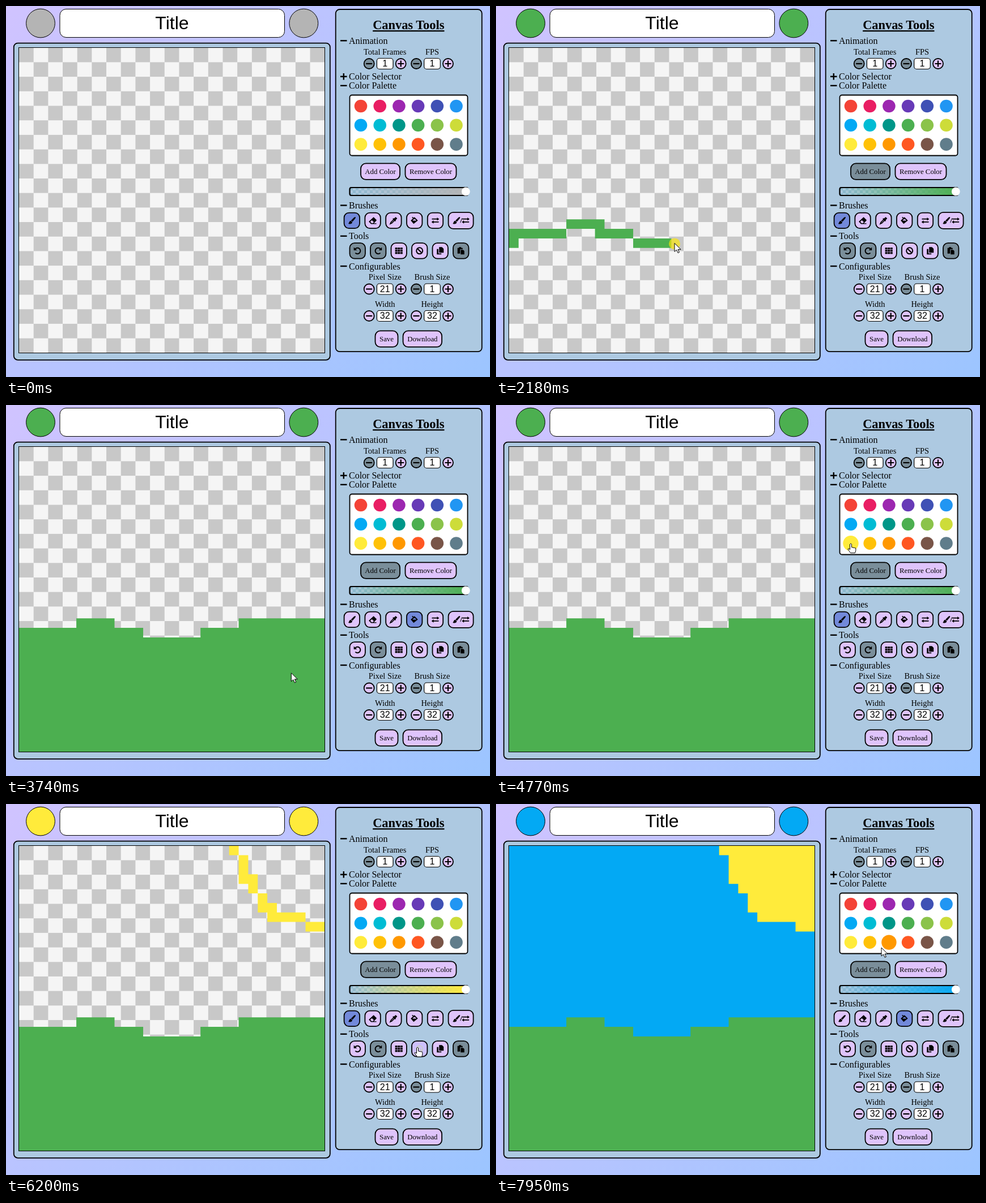
Recreate the animation shown at these times as an HTML page. Size 854 by 656 pixels, loop 7.99 s.

```html
<!DOCTYPE html>
<html lang="en">
<head>
<meta charset="utf-8">
<title>Pixel editor</title>
<style>
html, body { margin: 0; width: 100%; height: 100%; overflow: hidden; }
svg { display: block; font-family: "Liberation Serif", "Times New Roman", serif; }
text { text-anchor: middle; }
.left { text-anchor: start; }
.sans { font-family: "Liberation Sans", Arial, sans-serif; }
.line { fill: none; stroke: currentColor; stroke-width: 2; }
.panel { fill: #adc9e1; stroke: #000; stroke-width: 1.8; }
.icon { fill: currentColor; fill-rule: evenodd; }
</style>
</head>
<body>
<svg id="stage" width="854" height="656" viewBox="0 0 854 656"></svg>
<script>
const LOOP = 7990, LEFT = 23, TOP = 73.7, WIDE = 539.2, HIGH = 539.6, COUNT = 32;
const LILAC = '#dfc4fb', GREY = '#7a8e9a', ACTIVE = '#7289da', HOVER = '#cabffc';
const palette = ('f44336 e91e63 9c27b0 673ab7 3f51b5 2196f3 03a9f4 00bcd4 009688 ' +
  '4caf50 8bc34a cddc39 ffeb3b ffc107 ff9800 ff5722 795548 607d8b').split(' ').map(c => '#' + c);
const AZURE = 6, GREEN = 9, LIME = 11, YELLOW = 12, ORANGE = 14;
const brushes = ['brush', 'eraser', 'dropper', 'bucket', 'swap', 'both'];
const tools = ['undo', 'redo', 'grid', 'ban', 'copy', 'paste'];

const clamp = v => Math.max(0, Math.min(1, v));
const ramp = (t, start) => clamp((t - start) / 200);
const mix = (a, b, k) => `color-mix(in srgb, ${b} ${k * 100}%, ${a})`;

// ---- places
const at = (x, y) => ({ x, y });
const dot = i => ({ x: 626 + i % 6 * 33.7, y: 177 + Math.floor(i / 6) * 33.8, color: palette[i] });
const brushAt = name => ({ x: 610.3 + 36.8 * brushes.indexOf(name), y: 379.3, tool: name });
const toolAt = name => ({ x: 620.2 + 36.5 * tools.indexOf(name), y: 432.8 });
const cellX = c => LEFT + c * WIDE / COUNT, cellY = r => TOP + r * HIGH / COUNT;
const cell = ([c, r]) => ({ x: cellX(c + .5), y: cellY(r + .5), canvas: true });

// ---- strokes: straight walks over the cells between corner points
function walk(points) {
  const out = [points[0]];
  for (const [c, r] of points.slice(1)) {
    const [c0, r0] = out[out.length - 1];
    const n = Math.max(Math.abs(c - c0), Math.abs(r - r0));
    for (let i = 1; i <= n; i++) out.push([Math.round(c0 + (c - c0) * i / n), Math.round(r0 + (r - r0) * i / n)]);
  }
  return out;
}
const ground = { color: palette[GREEN], start: 1530, end: 2740, down: true,
  cells: walk([[0, 20], [0, 19], [5, 19], [6, 18], [9, 18], [9, 19], [12, 19], [13, 20],
    [19, 20], [19, 19], [23, 19], [23, 18], [31, 18]]) };
const sun = { color: palette[YELLOW], start: 5250, end: 5850,
  cells: walk([[22, 0], [23, 1], [23, 3], [24, 3], [24, 4], [25, 5], [25, 6], [26, 6], [26, 7], [29, 7], [30, 8], [31, 8]]) };
const strokes = [ground, sun];
const cellTime = (s, i) => s.start + (s.end - s.start) * i / (s.cells.length - 1);

// ---- pointer script
const track = [], clicks = [], presses = [];
function visit(arrive, leave, place) {
  track.push([arrive, place.x, place.y], [leave, place.x, place.y]);
}
function click(arrive, leave, place) {
  visit(arrive, leave, place);
  clicks.push({ ...place, time: arrive + 60 });
  presses.push([arrive + 50, arrive + 90]);
}
function paint(s) {
  s.cells.forEach((c, i) => visit(cellTime(s, i), cellTime(s, i), cell(c)));
  presses.push([s.start - 40, s.end]);
}
visit(30, 30, at(806, 590));
visit(390, 590, dot(AZURE));
click(760, 900, dot(GREEN));
visit(1400, 1520, at(27, 416));
paint(ground);
visit(2920, 2920, at(641, 394));
click(3170, 3260, brushAt('bucket'));
click(3600, 3690, cell([26, 25]));
click(3850, 4080, brushAt('brush'));
visit(4330, 4330, dot(LIME));
click(4740, 4860, dot(YELLOW));
paint(sun);
visit(6170, 6230, at(726, 430));
click(6330, 6420, brushAt('bucket'));
click(6590, 6840, cell([28, 3]));
visit(6970, 7040, at(688, 258));
click(7200, 7310, dot(AZURE));
click(7590, 7690, cell([25, 13]));
visit(7850, 7910, dot(ORANGE));
visit(7950, LOOP, at(680, 254));

const fills = clicks.filter(c => c.canvas).map(c => c.time);
const last = (t, key) => clicks.filter(c => c[key] && c.time <= t).pop();

function pointer(t) {
  const i = track.findIndex(k => k[0] > t);
  if (i < 1) return [-99, -99];
  const [a, b] = [track[i - 1], track[i]];
  let k = (t - a[0]) / (b[0] - a[0]);
  if (b[0] - a[0] > 60) k = k * k * (3 - 2 * k);
  return [a[1] + (b[1] - a[1]) * k, a[2] + (b[2] - a[2]) * k];
}

function strokePath(s, t) {
  const filled = t >= fills[strokes.indexOf(s)];
  return s.cells.map(([c, r], i) => {
    if (t < (i ? cellTime(s, i) : s.start - 30)) return '';
    const right = cellX(filled && !s.down ? COUNT : c + 1);
    const bottom = cellY(filled && s.down ? COUNT : r + 1);
    return `M${cellX(c)} ${cellY(r)}H${right}V${bottom}H${cellX(c)}Z`;
  }).join('');
}

// ---- markup helpers
const text = (s, x, y, size, extra = '') => `<text x="${x}" y="${y}" font-size="${size}" ${extra}>${s}</text>`;
const box = (x1, y1, x2, y2, r, extra) =>
  `<rect x="${x1}" y="${y1}" width="${x2 - x1}" height="${y2 - y1}" rx="${r}" ${extra}/>`;
const path = (d, extra = '') => `<path d="${d}" ${extra}/>`;
const line = (d, w = 2) => path(d, `class="line" style="stroke-width:${w}"`);
const move = (x, s) => `<g transform="translate(${x} 0)">${s}</g>`;

const targets = [];
const off = () => GREY;
function button(cx, cy, w, h, r, inner, state = () => LILAC) {
  targets.push({ state, hit: (x, y) => Math.abs(x - cx) < w / 2 && Math.abs(y - cy) < h / 2 });
  return `<g class="target" transform="translate(${cx} ${cy})">
    ${box(1 - w / 2, 1 - h / 2, w / 2 - 1, h / 2 - 1, r, 'stroke="#000" stroke-width="1.8"')}
    <g class="icon">${inner}</g></g>`;
}
const label = (s, cx, cy, w, state) => button(cx, cy, w, 30.5, 9, text(s, 0, 4.3, 12.8), state);

const brush = path('M6-6.4C7.2-6 6.5-4.5 5.5-3L1 2.3-1.5 0 4-5.5ZM-1.9.5L.7 3C.6 6-3 6.5-6.5 5.8-4.5 4.5-5 1-1.9.5Z');
const swap = line('M-6-2.6H4M-4 2.6H6', 1.7) + path('M3-5.4L6.8-2.6 3 .2ZM-3-.2L-6.8 2.6-3 5.4Z');
const undo = line('M-4.2-3A5.2 5.2 0 1 1-3.8 3.8') + path('M-6.5-6.3V-.8H-1Z');
const steps = [-1, 0, 1];
const icons = {
  brush, swap, undo,
  redo: `<g transform="scale(-1 1)">${undo}</g>`,
  both: move(-8, brush) + line('M-1 4L2-4', 1) + move(8.5, swap),
  grid: steps.flatMap(i => steps.map(j => box(4.6 * i - 2, 4 * j - 1.6, 4.6 * i + 2, 4 * j + 1.6, 0))).join(''),
  ban: '<circle r="5.5" class="line"/>' + line('M-4-4L4 4'),
  eraser: path('M-7 2L1.5-6 7-.5 2 5H6.5V6.2H-3ZM-4.5 2.3L-2 4.8H0L2 3-1.5-.6Z'),
  dropper: line('M1-2.5L-4.5 3-5.8 5.8-3 4.5 2.5-1', 1.6) + line('M-1-3.5L3.5 1', 2) + line('M1.5-1.5L5-5', 4),
  bucket: path('M-6.5 0L0-6 6 0-1.5 6ZM-3.5.2H3.5L0-3.5Z') + line('M-4-6L0-2.5', 1.6),
  copy: path('M-2-6.5H3L6-3.5V3.5H-2ZM-6-3H-3.2V4.8H2V6.5H-6Z'),
  paste: path('M-6-5H-3.5V-6.5H.5V-5H3V-2.5H-1.5V5H-6ZM-.5-1.5H4L6 .5V6.5H-.5Z')
};

const section = (name, y, closed) => text(name, 605, y + 5.5, 16, 'class="left"') +
  line(`M590 ${y}h11.5` + (closed ? `M595.8 ${y - 5.7}v11.4` : ''), 2.4);

function counter(name, value, x, y, atMin) {
  const minus = 'M-5.5 0H5.5';
  const knob = (dx, d, state) => button(x + dx, y, 20, 20, 9, line(d, 2.2), state);
  return text(name, x, y - 16.5, 14.4) + knob(-28, minus, atMin ? off : undefined) +
    box(x - 14.3, y - 9.5, x + 14.3, y + 9.5, 4.5, 'fill="#fff" stroke="#000" stroke-width="1.2"') +
    text(value, x, y + 5.3, 16, 'class="sans"') + knob(28, minus + 'M0-5.5V5.5');
}

function swatch(color, i) {
  const { x: cx, y: cy } = dot(i);
  targets.push({ dot: true, hit: (x, y) => Math.hypot(x - cx, y - cy) < 15 });
  return `<circle class="target" cx="${cx}" cy="${cy}" r="11.3" fill="${color}"/>`;
}

function bucketOn(t) {
  return clicks.filter(c => c.tool).reduce((v, c) => v + (c.tool === 'bucket' ? 1 : -1) * ramp(t, c.time), 0);
}
const states = {
  brush: t => mix(ACTIVE, LILAC, bucketOn(t)),
  bucket: t => mix(LILAC, ACTIVE, bucketOn(t)),
  undo: t => mix(GREY, LILAC, ramp(t, ground.end + 40)),
  redo: off, paste: off
};
function tool(name, { x, y }) {
  return name === 'both' ? button(802.6, y, 46, 31, 8.5, icons.both) : button(x, y, 29.4, 29.5, 8.5, icons[name], states[name]);
}

const stage = document.getElementById('stage');
stage.innerHTML = `
<defs>
  <linearGradient id="wash" gradientUnits="userSpaceOnUse" x1="49" y1="-49" x2="805" y2="705">
    <stop stop-color="#d0c3ff"/><stop offset="1" stop-color="#9cc5ff"/></linearGradient>
  <linearGradient id="fade"><stop class="tint" stop-opacity="0"/><stop class="tint" offset="1"/></linearGradient>
  <pattern id="check" width="2" height="2" patternUnits="userSpaceOnUse"
    patternTransform="translate(${LEFT} ${TOP}) scale(${WIDE / 21} ${HIGH / 21})">
    <path d="M0 0h2v2h-2z" fill="#f5f5f5"/><path d="M0 0h1v1h-1zM1 1h1v1h-1z" fill="#c8c8c8"/></pattern>
  <pattern id="tiny" x="607" y="321" width="10" height="10" patternUnits="userSpaceOnUse">
    <path d="M0 0h5v5h-5zM5 5h5v5h-5z" fill="#8fbad2"/></pattern>
</defs>
<rect width="854" height="656" fill="url(#wash)"/>
${[61, 525.3].map(x => `<circle class="now" cx="${x}" cy="30.5" r="25.4" stroke="#000"/>`).join('')}
${box(95, 5.5, 491.5, 55.5, 11, 'fill="#fff" stroke="#000"')}
${text('Title', 293, 41, 32, 'class="sans"')}
${box(13.8, 65.6, 571.8, 625.8, 7, 'class="panel"')}
${box(581.7, 6, 839.7, 611.2, 7, 'class="panel"')}
${box(LEFT, TOP, LEFT + WIDE, TOP + HIGH, 0, 'fill="url(#check)"')}
${box(LEFT, TOP, LEFT + WIDE, TOP + HIGH, 0, `id="flood" fill="${palette[AZURE]}"`)}
${strokes.map(s => path('', `class="stroke" fill="${s.color}"`)).join('')}
${box(22.5, 73.5, 562.5, 613.5, 0, 'fill="none" stroke="#000"')}
${text('Canvas Tools', 710.3, 41, 22.4, 'font-weight="bold" text-decoration="underline"')}
${section('Animation', 61.3)}
${counter('Total Frames', 1, 668.7, 102, true)}
${counter('FPS', 1, 752, 102, true)}
${section('Color Selector', 124.7, true)}
${section('Color Palette', 140.8)}
${box(606.5, 157.5, 814.5, 264.5, 4, 'fill="#fff" stroke="#000" stroke-width="1.8"')}
${palette.map(swatch).join('')}
${label('Add Color', 660.5, 292.7, 71, t => mix(LILAC, GREY, ramp(t, clicks[0].time)))}
${label('Remove Color', 749.5, 292.7, 92)}
${['tiny', 'fade'].map(id => box(606.5, 321, 815, 335, 3, `fill="url(#${id})" stroke="#000" stroke-width="1.8"`)).join('')}
<circle cx="811.3" cy="328" r="7.4" fill="#fff"/>
${section('Brushes', 352.5)}
${brushes.map(b => tool(b, brushAt(b))).join('')}
${section('Tools', 406.8)}
${tools.map(b => tool(b, toolAt(b))).join('')}
${section('Configurables', 460)}
${counter('Pixel Size', 21, 668.7, 500.5)}
${counter('Brush Size', 1, 752, 500.5, true)}
${counter('Width', 32, 668.7, 548)}
${counter('Height', 32, 752, 548)}
${label('Save', 671.5, 588.7, 42)}
${label('Download', 734.8, 588.7, 70.5)}
<g id="pointer" stroke="#000" stroke-linejoin="round" fill="#fff">
  <circle id="press" r="10" cy="1" fill="#ffe800" fill-opacity=".65" stroke="none"/>
  <path id="arrow" d="M0 0V15L3.5 11.8 6 17.2 8.4 16.2 6 11H11Z"/>
  <path id="hand" d="M-1.5 1.5Q0-1 1.5 1.5V7L6.5 8Q8.8 7.5 8.8 9.5V13L7.5 17H-.5L-5 10.5Q-4.8 8-1.5 11Z"/>
</g>`;

const all = s => [...stage.querySelectorAll(s)];
const find = id => document.getElementById(id);
const show = (el, on) => el.setAttribute('visibility', on ? 'visible' : 'hidden');
all('.target').forEach((el, i) => targets[i].el = el);
const strokeEls = all('.stroke'), nowEls = all('.now'), tints = all('.tint');

function draw(t) {
  const color = (last(t, 'color') || { color: '#b4b4b4' }).color;
  nowEls.forEach(el => el.style.fill = color);
  tints.forEach(el => el.style.stopColor = color);
  strokeEls.forEach((el, i) => el.setAttribute('d', strokePath(strokes[i], t)));
  show(find('flood'), t >= fills[2]);

  // hover fades over the recent pointer positions
  const trail = [0, 1, 2, 3, 4].map(i => pointer(t - i * 25));
  const [x, y] = trail[0];
  let hand = false;
  for (const { el, dot, hit, state } of targets) {
    const fill = dot ? '' : state(t);
    const locked = fill === GREY;
    const hover = locked ? 0 : trail.filter(p => hit(...p)).length / trail.length;
    if (!locked && hit(x, y)) hand = true;
    if (dot) {
      el.setAttribute('r', 11.3 + 2.4 * hover);
    } else {
      el.firstElementChild.style.fill = mix(fill, HOVER, hover);
      el.lastElementChild.style.color = mix('#000', '#fff', hover);
    }
  }
  find('pointer').setAttribute('transform', `translate(${x} ${y})`);
  show(find('hand'), hand);
  show(find('arrow'), !hand);
  show(find('press'), presses.some(([a, b]) => t >= a && t < b));
}

const begin = performance.now();
(function tick() {
  draw((performance.now() - begin) % LOOP);
  requestAnimationFrame(tick);
})();
</script>
</body>
</html>
```
